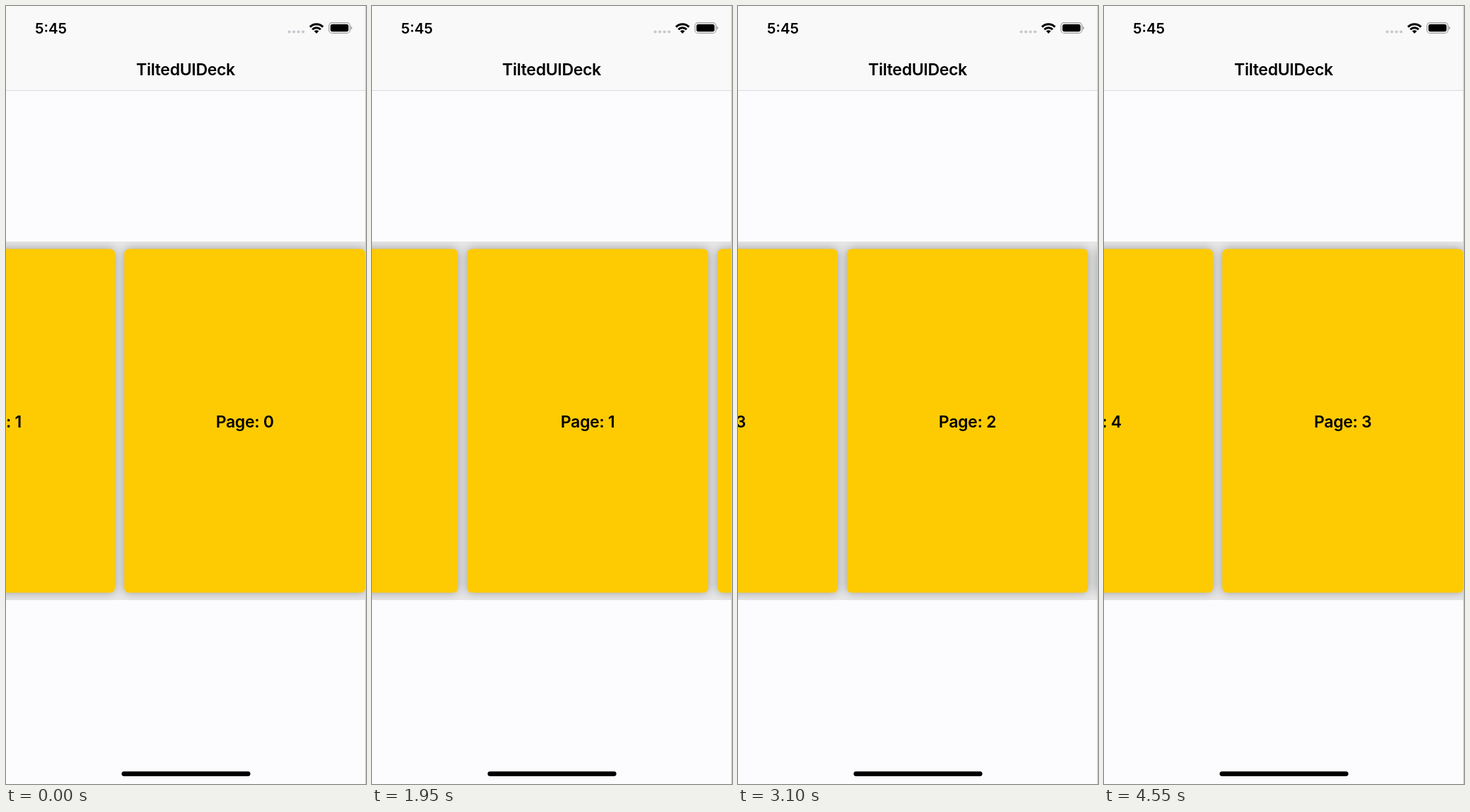
Animation of 509 by 1100 pixels, one loop 4600 ms. Source, as an HTML page:

```html
<!DOCTYPE html>
<html lang="en">
<head>
<meta charset="utf-8">
<title>Pager</title>
<style>
  html, body { margin: 0; width: 100%; height: 100%; overflow: hidden; background: #fcfcfe; }
  svg { display: block; font-family: Inter, sans-serif; font-weight: 600; }
  .card { fill: #fecb02; filter: drop-shadow(0 0 6.8px rgba(0, 0, 0, .33)); }
  .label { font-size: 23px; letter-spacing: -.3px; text-anchor: middle; }
</style>
</head>
<body>
<svg width="509" height="1100" viewBox="0 0 509 1100">
  <svg id="pager" y="333" width="509" height="507" overflow="hidden">
    <rect width="509" height="507" fill="#e8e8e9"/>
  </svg>

  <rect width="509" height="119" fill="#f9f9fa"/>
  <rect y="119" width="509" height="1" fill="#d8d8df"/>
  <text x="63.5" y="38.7" font-size="20.4" text-anchor="middle">5:45</text>
  <text class="label" x="254" y="97.7">TiltedUIDeck</text>

  <g fill="#c8c8ce">
    <circle cx="400.5" cy="36.5" r="2.1"/>
    <circle cx="407" cy="36.5" r="2.1"/>
    <circle cx="413.5" cy="36.5" r="2.1"/>
    <circle cx="420" cy="36.5" r="2.1"/>
  </g>
  <g fill="none" stroke="#000" stroke-width="3">
    <path d="M429.8 29.6a13 13 0 0 1 18.4 0"/>
    <path d="M433.2 33.2a8.2 8.2 0 0 1 11.6 0"/>
  </g>
  <path d="M439 39l-3.3-3.4a4.7 4.7 0 0 1 6.6 0z"/>
  <rect x="456.6" y="23.6" width="29.8" height="14.8" rx="4.5" fill="none" stroke="#a0a0a2" stroke-width="1.2"/>
  <rect x="458.7" y="25.7" width="25.6" height="10.6" rx="2.8"/>
  <path d="M487.5 28.5q2 .7 2 2.5t-2 2.5z" fill="#a0a0a2"/>

  <rect x="163.5" y="1082.2" width="182" height="6.8" rx="3.4"/>
  <rect x="507.8" width="1.2" height="1100" fill="#92ff6c"/>
</svg>
<script>
  const LOOP = 4600, TICK = 50, PITCH = 354, DRAG_TIME = 500, DRAG = 300;
  const CARD = { x: 167.3, y: 10.6, width: 340.7, height: 486, rx: 6.5 };
  const swipes = [
    { start: 1250, release: 1900, settle: 300 },
    { start: 2500, release: 3000, settle: 250 },
    { start: 3800, release: 4300, settle: 250 },
  ];

  function add(parent, tag, attributes, text = '') {
    const node = document.createElementNS('http://www.w3.org/2000/svg', tag);
    for (const [name, value] of Object.entries(attributes)) node.setAttribute(name, value);
    node.textContent = text;
    return parent.appendChild(node);
  }

  const pager = document.getElementById('pager');
  const pages = Array.from({ length: 5 }, (_, i) => {
    const page = add(pager, 'g', {});
    add(page, 'rect', { class: 'card', ...CARD });
    add(page, 'text', { class: 'label', x: CARD.x + CARD.width / 2, y: 262.5 }, `Page: ${i}`);
    return page;
  });

  const clamp = u => Math.min(1, Math.max(0, u));
  const smooth = u => u * u * (3 - 2 * u);
  const easeOut = u => 1 - (1 - u) ** 2.75;

  // A finger drag that gathers speed, then a snap to the next page.
  function swipeOffset(t, { start, release, settle }) {
    const drag = smooth(clamp((t - start) / DRAG_TIME) ** 1.74);
    const snap = easeOut(clamp((t - release) / settle));
    return DRAG * drag + (PITCH - DRAG) * snap;
  }

  function draw() {
    const t = Math.floor(performance.now() % LOOP / TICK) * TICK;
    const offset = swipes.reduce((sum, swipe) => sum + swipeOffset(t, swipe), 0);
    pages.forEach((page, i) => page.setAttribute('transform', `translate(${offset - PITCH * i})`));
    requestAnimationFrame(draw);
  }
  draw();
</script>
</body>
</html>
```
